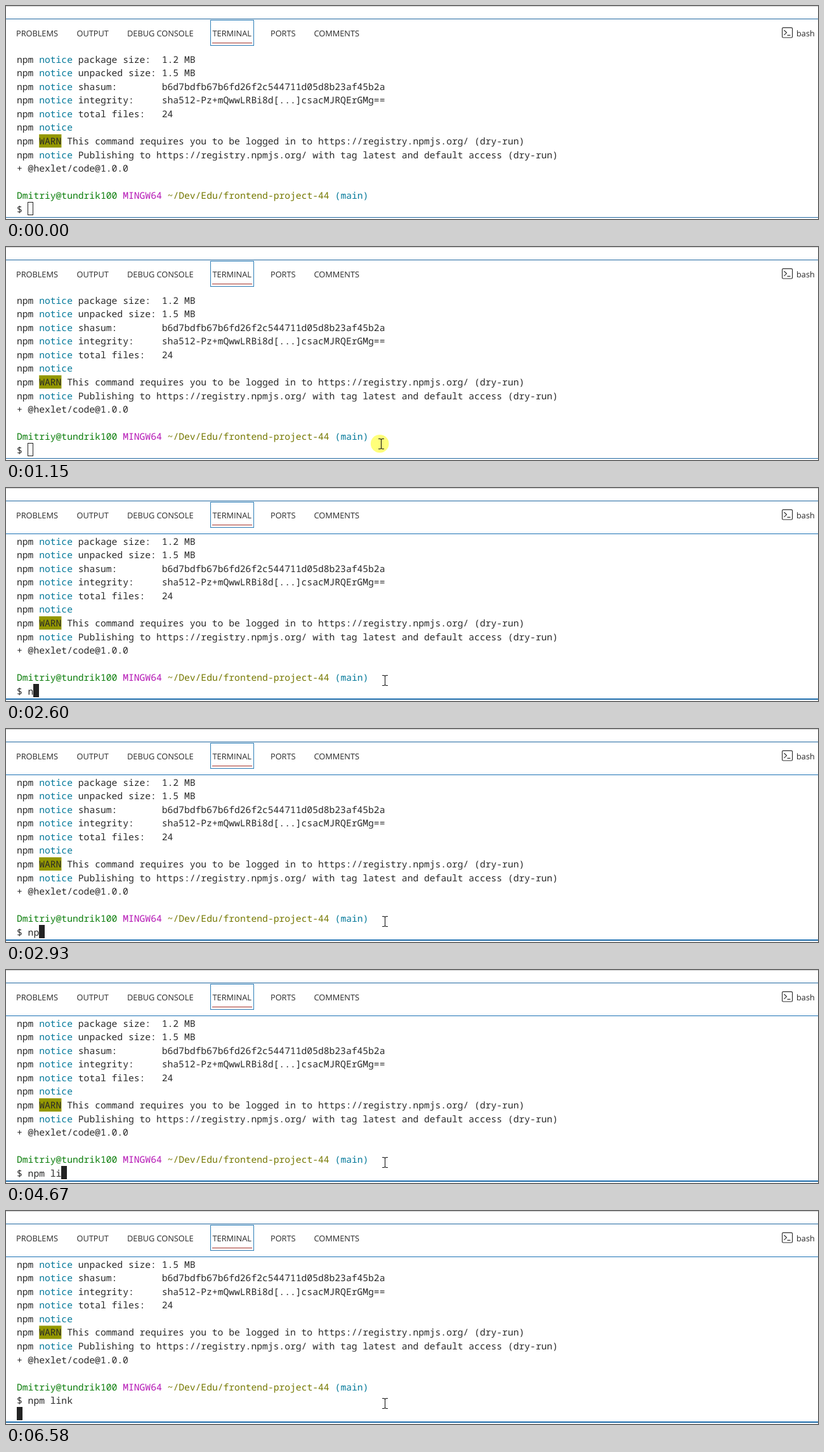
Recreate the animation shown at these times as an HTML page. Size 1280 by 337 pixels, loop 8000 ms.

```html
<!DOCTYPE html>
<html lang="en">
<head>
<meta charset="utf-8">
<title>Terminal</title>
<style>
  html, body { margin: 0; width: 100%; height: 100%; overflow: hidden; background: #fff; }
  svg { display: block; }
  text { white-space: pre; text-rendering: geometricPrecision; }
  .ui text { font: 12.75px "Open Sans", "Noto Sans", sans-serif; fill: #292929; }
  .term text { font: 14.667px "Noto Sans Mono", "DejaVu Sans Mono", monospace; font-variant-ligatures: none; }
  #halo { mix-blend-mode: multiply; }
</style>
</head>
<body>
<svg id="stage" width="1280" height="337" viewBox="0 0 1280 337">
  <rect width="1280" height="337" fill="#fff"/>
  <rect width="1280" height="1" fill="#cbcbcb"/>
  <g fill="#1f679f">
    <rect y="20" width="1280" height="1"/>
    <rect y="334" width="1280" height="1"/>
  </g>
  <g class="ui" id="ui">
    <rect x="322.5" y="22.5" width="68" height="40" fill="none" stroke="#2f7fb8"/>
    <rect x="325" y="58" width="63" height="1" fill="#a5302a"/>
    <g fill="none" stroke="#333" stroke-width="1.2">
      <rect x="1223.6" y="34.4" width="16" height="15.6" rx="1.5"/>
      <path d="M1226.5 38.3l4 3.8-4 3.8M1231.5 46.4h5"/>
    </g>
  </g>
  <g class="term">
    <g id="log"></g>
    <rect id="caret" width="8" height="20" stroke="#232323"/>
  </g>
  <g id="focus" fill="#1a70b5">
    <rect y="72" width="1280" height="1"/>
    <rect y="333" width="1280" height="1"/>
  </g>
  <circle id="halo" r="14.3" fill="#ffff7a"/>
  <path id="beam" d="M-4.5-8H-1.5L0-7L1.5-8H4.5M0-7V7M-4.5 8H-1.5L0 7L1.5 8H4.5" fill="none" stroke="#1a1a1a" stroke-width="1.1"/>
</svg>
<script>
const LOOP = 8000, X0 = 17, Y0 = 73.2, CELL = 8.8, ROW = 21.55;
const INK = '#292929', CYAN = '#04799a', GREEN = '#0b7d0b', PINK = '#b414b4', OLIVE = '#757800';
const $ = id => document.getElementById(id);

function add(parent, tag, attrs, text = '') {
  const el = document.createElementNS('http://www.w3.org/2000/svg', tag);
  for (const k in attrs) el.setAttribute(k, attrs[k]);
  el.textContent = text;
  parent.append(el);
  return el;
}

const tabs = [['PROBLEMS', 16], ['OUTPUT', 111.5], ['DEBUG CONSOLE', 191], ['TERMINAL', 325.5],
  ['PORTS', 417], ['COMMENTS', 485.5], ['bash', 1246]];
for (const [name, x] of tabs) add($('ui'), 'text', { x, y: 47.5 }, name);

const notice = s => [['npm ', INK], ['notice', CYAN], [' ' + s, INK]];
const lines = [
  notice('package size:  1.2 MB'),
  notice('unpacked size: 1.5 MB'),
  notice('shasum:        b6d7bdfb67b6fd26f2c544711d05d8b23af45b2a'),
  notice('integrity:     sha512-Pz+mQwwLRBi8d[...]csacMJRQErGMg=='),
  notice('total files:   24'),
  notice(''),
  [['npm ', INK], ['WARN', INK, '#949800'],
    [' This command requires you to be logged in to https://registry.npmjs.org/ (dry-run)', INK]],
  notice('Publishing to https://registry.npmjs.org/ with tag latest and default access (dry-run)'),
  [['+ @hexlet/code@1.0.0', INK]],
  [],
  [['Dmitriy@tundrik100', GREEN], [' MINGW64', PINK], [' ~/Dev/Edu/frontend-project-44', OLIVE], [' (main)', CYAN]],
  [['$ ', INK], ['', INK]]
];

let typed;
const rows = lines.map((runs, r) => {
  const g = add($('log'), 'g', {});
  let col = 0;
  for (const [text, fill, bg] of runs) {
    const x = X0 + col * CELL, y = Y0 + r * ROW;
    if (bg) add(g, 'rect', { x, y: Math.round(y), width: text.length * CELL, height: 21, fill: bg });
    typed = add(g, 'text', { x, y: y + 16.5, fill }, text);
    col += text.length;
  }
  return g;
});

const COMMAND = 'npm link';
const keyTimes = [2600, 2930, 3280, 3480, 4270, 4670, 5200, 5330];
const ENTER = 6580, FOCUS = 1280, REST = 1410;

// Pointer position, held between evenly spaced steps
function pointer(t) {
  const held = (from, to, n) => Math.min(1, Math.floor((t - from) / (to - from) * n + 1e-6) / n);
  if (t < 1150) {
    const e = 1 - (1 - held(400, 950, 8)) ** 2;
    return [1073.5 - 470 * e, 346 - 40.5 * e];
  }
  const p = held(1150, REST, 4);
  return [591.5 + 6 * p, 311.5 - 7 * p];
}

const show = (el, on) => el.setAttribute('visibility', on ? 'visible' : 'hidden');

function render(t) {
  const done = t >= ENTER;
  const count = keyTimes.filter(k => t >= k).length;
  typed.textContent = COMMAND.slice(0, count);
  $('log').setAttribute('transform', `translate(0 ${done ? -ROW : 0})`);
  show(rows[0], !done);

  const focused = t >= FOCUS;
  show($('focus'), focused);
  const caret = $('caret');
  caret.setAttribute('x', Math.floor(X0 + (done ? 0 : 2 + count) * CELL) + 0.5);
  caret.setAttribute('y', 310.5);
  caret.setAttribute('fill', focused ? '#232323' : 'none');

  const [x, y] = pointer(t);
  show($('beam'), t >= 400);
  show($('halo'), t >= 400 && t < REST);
  $('beam').setAttribute('transform', `translate(${x} ${y})`);
  $('halo').setAttribute('transform', `translate(${x - 2.3} ${y - 0.3})`);
}

const start = performance.now();
function tick() {
  render((performance.now() - start) % LOOP);
  requestAnimationFrame(tick);
}
tick();
</script>
</body>
</html>
```
